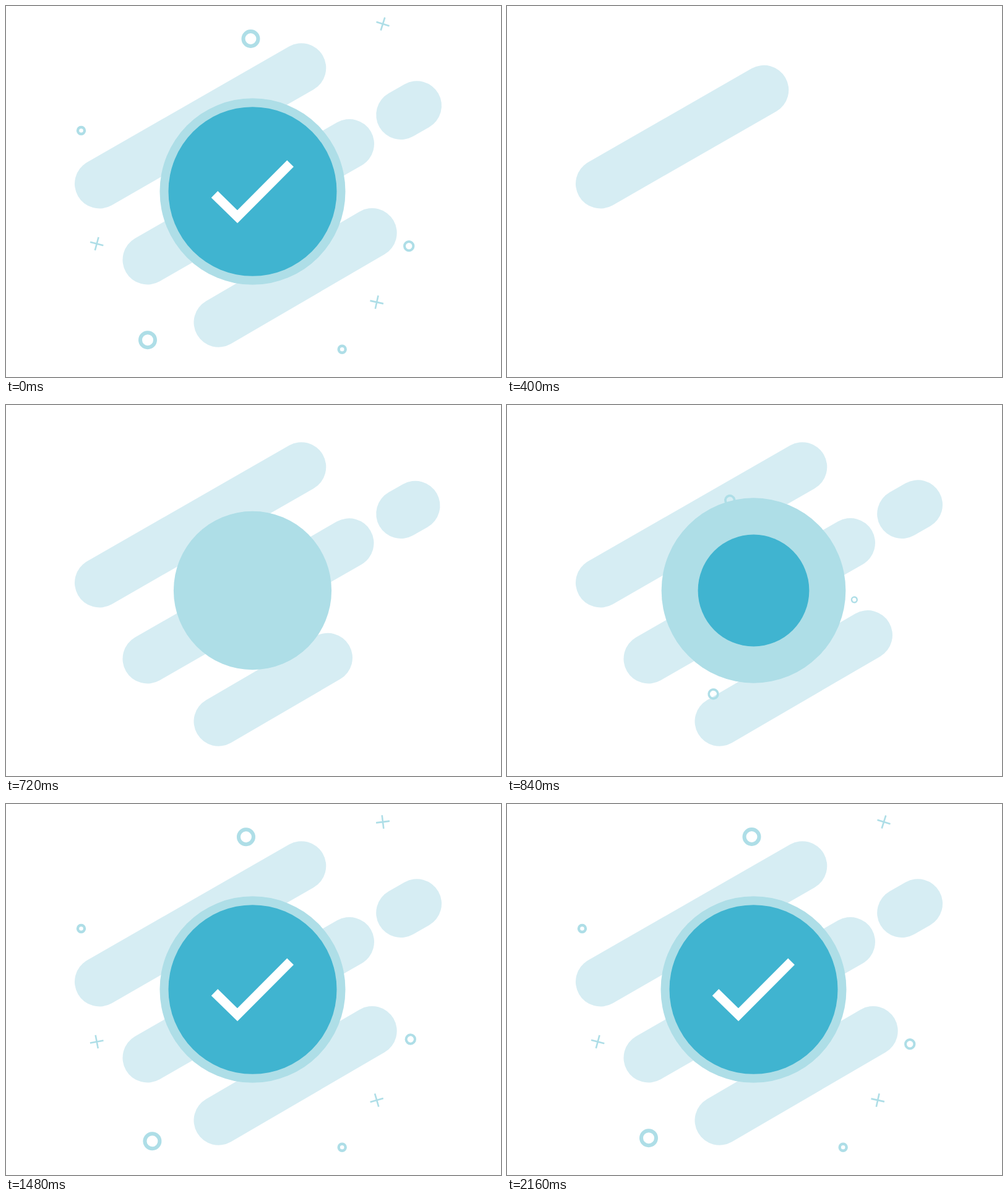
An HTML page for the animation above (2200 ms loop, 800 by 600 pixels).

```html
<!DOCTYPE html>
<html lang="en">
<head>
<meta charset="utf-8">
<title>Success check</title>
<style>
  html, body { margin: 0; width: 100%; height: 100%; overflow: hidden; background: #fff; }
  svg { display: block; width: 100%; height: 100%; }
</style>
</head>
<body>
<svg id="stage" viewBox="0 0 800 600">
  <g id="bars" stroke="#d6edf3" stroke-width="80" stroke-linecap="round"></g>
  <g id="decor" fill="none" stroke="#aedee7"></g>
  <ellipse id="halo" cx="398.5" cy="300" fill="#aedee7"/>
  <ellipse id="disc" cx="398.5" cy="300" fill="#40b4d0"/>
  <polyline id="check" fill="none" stroke="#fff" stroke-width="15"/>
</svg>
<script>
const LOOP = 2200, STEP = 40, RESTART = 200;
const CX = 398.5, CY = 300;
const $ = id => document.getElementById(id);

function add(parent, tag, attrs) {
  const el = document.createElementNS('http://www.w3.org/2000/svg', tag);
  parent.appendChild(el);
  return set(el, attrs);
}
function set(el, attrs) {
  for (const key in attrs) el.setAttribute(key, attrs[key]);
  return el;
}
const ratio = (t, start, dur) => Math.min(1, Math.max(0, (t - start) / dur));
const easeOut = p => 1 - (1 - p) ** 3;
const tween = (t, start, dur) => easeOut(ratio(t, start, dur));
const show = (el, on) => set(el, { visibility: on ? 'visible' : 'hidden' });

const bars = [
  { from: [151, 287.5], to: [477.3, 100.2], start: 247 },
  { from: [228.5, 410.5], to: [555, 223], start: 402 },
  { from: [638.2, 176], to: [664, 161.3], start: 526 },
  { from: [343.5, 511.7], to: [591.7, 367], start: 598 }
].map(b => ({ ...b, el: add($('bars'), 'line', { x1: b.from[0], y1: b.from[1] }) }));

// Rings that swing around the centre while growing, and rings that only grow
const ring = (parent, x, y, r, w) =>
  add(parent, 'circle', { cx: x, cy: y, r, 'stroke-width': w });
const swing = add($('decor'), 'g', {});
const burst = add($('decor'), 'g', {});
ring(swing, 395.5, 53, 12, 6);
ring(swing, 229, 540.2, 12, 6);
ring(swing, 651.2, 388.2, 7.2, 4);
ring(burst, 121.5, 201.5, 5.5, 4.4);
ring(burst, 543.2, 555.3, 5.5, 4.4);

// Angle at 1160 ms, then spin speed and its change per ms
const pluses = [
  { x: 609, y: 29, start: 867, angle: -22, speed: 0.0504, drag: 1.09e-5 },
  { x: 146.7, y: 384.5, start: 894, angle: -26.5, speed: 0.0525, drag: 1.09e-5 },
  { x: 599.2, y: 479, start: 965, angle: -30, speed: 0.0425, drag: 0 }
].map(p => ({
  ...p,
  el: add($('decor'), 'path', { d: 'M-11 0H11M0-11V11', 'stroke-width': 2.6 })
}));

const grow = (el, s, deg) => {
  show(el, s > 0);
  set(el, { transform: `translate(${CX} ${CY}) rotate(${deg}) scale(${s}) translate(${-CX} ${-CY})` });
};

function drawCheck(p) {
  const a = [337, 304.6], b = [374, 340.8], c = [459.6, 254.8];
  const len1 = Math.hypot(b[0] - a[0], b[1] - a[1]);
  const len2 = Math.hypot(c[0] - b[0], c[1] - b[1]);
  const len = p * (len1 + len2);
  const mix = (u, v, k) => [u[0] + (v[0] - u[0]) * k, u[1] + (v[1] - u[1]) * k];
  const pts = len <= len1
    ? [a, mix(a, b, len / len1)]
    : [a, b, mix(b, c, (len - len1) / len2)];
  show($('check'), p > 0);
  set($('check'), { points: pts.join(' ') });
}

function render(t) {
  for (const { from, to, start, el } of bars) {
    const p = tween(t, start, 360);
    show(el, p > 0);
    set(el, {
      x2: from[0] + (to[0] - from[0]) * p,
      y2: from[1] + (to[1] - from[1]) * p
    });
  }

  grow(swing, tween(t, 732, 400), -17.85 * (1 - tween(t, 732, 1388)));
  grow(burst, tween(t, 852, 400), 0);

  for (const { x, y, start, angle, speed, drag, el } of pluses) {
    const p = ratio(t, start, 400), s = easeOut(p), u = t - 1160;
    const deg = angle + speed * u - drag * u * u;
    set(el, {
      opacity: p,
      transform: `translate(${CX + (x - CX) * s} ${CY + (y - CY) * s}) rotate(${deg})`
    });
  }

  const halo = tween(t, 551, 360), disc = tween(t, 731, 360);
  set($('halo'), { rx: 150 * halo, ry: 150.8 * halo });
  set($('disc'), { rx: 136 * disc, ry: 136.8 * disc });
  drawCheck(tween(t, 1064, 360));
}

// The finished picture rests at the start of each loop
function pose(ms) {
  const t = Math.floor((ms % LOOP) / STEP) * STEP;
  return t >= RESTART ? t : t < STEP ? LOOP - STEP : LOOP;
}

const begin = performance.now();
function tick() {
  render(pose(performance.now() - begin));
  requestAnimationFrame(tick);
}
tick();
</script>
</body>
</html>
```
